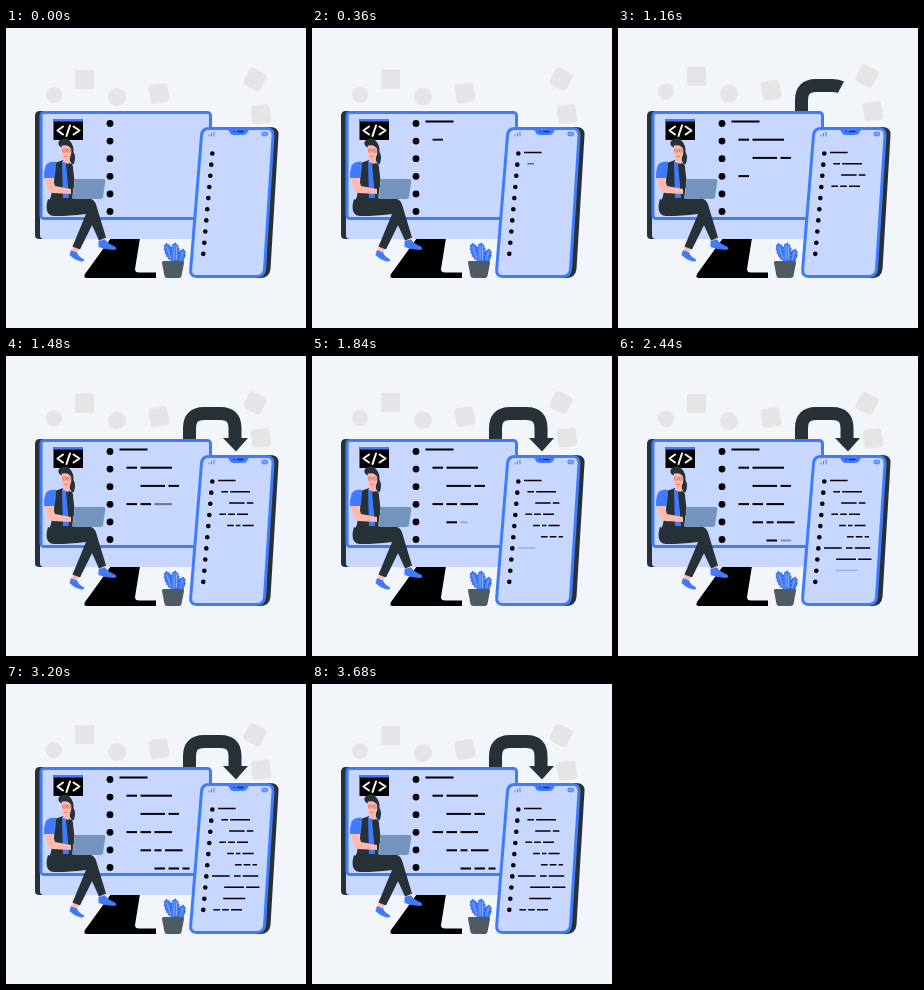
Write an HTML page that moves like this. It is 300 px wide and 300 px high and loops after 3.76 s.

```html
<!DOCTYPE html>
<html lang="en">
<head>
<meta charset="utf-8">
<title>Code to mobile</title>
<style>
  html, body { margin: 0; width: 100%; height: 100%; overflow: hidden; background: #f2f5f9; }
  svg { display: block; width: 100vw; height: 100vh; }
  .blue { fill: #407bff; }
  .pale { fill: #c7d7ff; }
  .dark { fill: #263238; }
  .skin { fill: #ffb9ad; }
  .edge { stroke: #407bff; stroke-width: 3; }
  .pen { fill: none; stroke-linecap: round; stroke-linejoin: round; }
</style>
</head>
<body>
<svg viewBox="0 0 300 300">
  <g id="badges" fill="#e4e5e6">
    <circle cx="48" cy="67" r="8"/>
    <rect x="69" y="42" width="19" height="19"/>
    <circle cx="111" cy="69" r="9"/>
    <rect x="143.5" y="56" width="19" height="19" rx="4" transform="rotate(-9 153 65.5)"/>
    <rect x="239.5" y="42" width="19" height="19" rx="4" transform="rotate(27 249 51.5)"/>
    <rect x="245.5" y="77" width="19" height="19" rx="4" transform="rotate(-7 255 86.5)"/>
  </g>

  <path id="shaft" pathLength="100" d="M183.5 86V72Q183.5 57.5 198 57.5H214.5Q229 57.5 229 72V83"
    fill="none" stroke="#263238" stroke-width="13" stroke-dasharray="100 200"/>
  <path id="head" class="dark" d="M217 82H242L230 95.5Z"/>

  <g id="monitor">
    <path d="M105 210H134L129 241Q129 244.500 133 244.500H150V250H81Q77 250 79 246Z"/>
    <path class="dark" d="M34 83H45V211H33Q29 211 29 207V88Q29 83 34 83Z"/>
    <path class="pale" d="M34 189H204V211H38Q34 211 34 207Z"/>
    <rect class="pale edge" x="35" y="84.500" width="169.500" height="106" rx="3"/>
    <rect x="47.500" y="91" width="29.500" height="21"/>
    <rect class="blue" x="47.500" y="91" width="29.500" height="2.500"/>
    <path class="pen" stroke="#fff" stroke-width="2" d="M57 98.500L51.500 102.500L57 106.500M64 97.500L60.500 108M67.500 98.500L73.500 102.500L67.500 106.500"/>
  </g>

  <g id="phone">
    <path class="dark" d="M205 99H264Q273 99 272.500 107L264.500 241Q263.500 250 254 250H194Z"/>
    <path class="pale edge" d="M203 100.500H260.500Q267.500 100.500 267 108L258.500 241Q258 248.500 250 248.500H190.500Q184 248.500 184.700 241L195.500 107.500Q196 100.500 203 100.500Z"/>
    <path class="blue" d="M219 100H246Q242.500 101.500 241.500 104Q240.500 107 237 107H228Q224.500 107 223.500 104Q222.500 101.500 219 100Z"/>
    <path class="pen" stroke="#263238" stroke-width="1.400" d="M228 103.500H228.100M231.500 103.500H237"/>
    <path class="pen" stroke="#407bff" d="M203 108V107M205.500 108V105.500M208 108V104"/>
    <rect x="256" y="104.200" width="5.500" height="3.600" rx="1.300" fill="#7fa5ff" stroke="#407bff"/>
  </g>

  <g id="plant">
    <g class="blue" stroke="#263238" stroke-dasharray="1 2.500" stroke-width=".8">
      <ellipse cx="163" cy="224" rx="4" ry="9" transform="rotate(-20 163 224)"/>
      <ellipse cx="175.500" cy="228" rx="3.500" ry="7" transform="rotate(15 175.500 228)"/>
      <ellipse cx="169" cy="225" rx="4.500" ry="10"/>
    </g>
    <path class="pen" stroke="#9dbcff" stroke-width=".8" d="M161 219L165 231M168 218V231M170.500 218V231M176.500 224L174.500 231"/>
    <path fill="#4f5b62" d="M157.500 233H176.500Q178.500 233 178 235L175.500 248Q175 250 173 250H161Q159 250 158.500 248L156 235Q155.500 233 157.500 233Z"/>
  </g>

  <g id="coder">
    <path class="skin" d="M67 216L73 218L71 226L66 225ZM92 208L98 207L100 213L95 216Z"/>
    <path class="blue" d="M65 222L71 224.500Q73 229 77.500 231Q79 233.500 76 233.500Q69 232.500 63.500 227ZM92.500 213L99 211.500Q103 216.500 109 218.500Q112 221.500 108 222Q100 222 92.500 219Z"/>
    <path class="dark" d="M42 171Q38 184 45 187.500Q52 189 80 186L66.500 218.500L74 221.500L91 187Z"/>
    <path class="dark" d="M44 170H82Q89 171 90.500 178L100 209.500L93 212.500L80 184L46 186Z"/>
    <path class="dark" d="M49 135L57 132L66 136L68.500 152L66 172H44L48 155Z"/>
    <path class="blue" d="M56 133L61 134L62 146L63 170H57Z"/>
    <path class="dark" d="M60 136L67 138L68 158L63 168Z"/>
    <path class="skin" d="M39 148L46 148L49 158L65 161V166L47 165Q42 164 41 159Z"/>
    <path class="blue" d="M50 134Q42 133 39.500 138Q37.500 144 38 150H48Q50 145 50 134Z"/>
    <path class="dark" d="M53 113Q58 108 63 112Q68 117 67.500 124Q71 130 67 137Q63 134 63 126L55 119Q51 117 53 113Z"/>
    <path class="skin" d="M56 116Q61 113 64.500 118Q66.500 125 64 129L63 136L57 134V130.500Q55 125 56 116Z"/>
    <path class="dark" d="M53.500 113Q60 109 65 115L65.500 121Q62 116 57 117.500Q52.500 117.500 53.500 113Z"/>
    <path class="pen" stroke="#c9655f" stroke-width=".8" d="M56.500 122.500a1.700 1.700 0 1 0 3.400 0a1.700 1.700 0 1 0-3.400 0M61 122.500a1.700 1.700 0 1 0 3.400 0a1.700 1.700 0 1 0-3.400 0M58.500 128.500Q60 129.500 61.500 128"/>
    <path fill="#7294bd" d="M69 151H97.500Q99.500 151 99.300 153L97 169Q96.700 171 94.500 171H66.500Z"/>
  </g>
</svg>
<script>
const LOOP = 3760;
const $ = id => document.getElementById(id);

// Both screens show this listing; every word becomes a bar.
const code = [
  '========',
  '  === =========',
  '      ======= ===',
  '  === === =====',
  '      === == =====',
  '          === === ==',
  '========  === =======',
  '      ========= ======',
  '      ==========',
  '  === === ====='
];

function add(parent, tag, attrs) {
  const el = document.createElementNS('http://www.w3.org/2000/svg', tag);
  for (const k in attrs) el.setAttribute(k, attrs[k]);
  return parent.appendChild(el);
}

const loop = (el, frames) => el.animate(frames, { duration: LOOP, iterations: Infinity });

// Holds the first pose until start, then the last one from end on.
function change(el, start, end, from, to, easing = 'linear') {
  loop(el, [
    { ...from, offset: 0 },
    { ...from, offset: start / LOOP, easing },
    { ...to, offset: end / LOOP },
    { ...to, offset: 1 }
  ]);
}

// timing(row, word, total) gives the moment a word appears.
function typeCode(screen, { rows, x, y, lean, step, char, weight, fade, dot, timing }) {
  let total = 0;
  code.slice(0, rows).forEach((text, row) => {
    const left = x - lean * row;
    add(screen, 'circle', { cx: left + dot.x, cy: dot.y + dot.step * row, r: dot.r });
    [...text.matchAll(/=+/g)].forEach((match, word) => {
      const bar = add(screen, 'rect', {
        x: left + match.index * char,
        y: y + step * row - weight / 2,
        width: match[0].length * char,
        height: weight
      });
      const at = timing(row, word, total++);
      change(bar, at, at + fade, { opacity: 0 }, { opacity: 1 });
    });
  });
}

typeCode($('monitor'), {
  rows: 6, x: 113.5, y: 93.5, lean: 0, step: 18.2, char: 3.5, weight: 2, fade: 120,
  dot: { x: -9.5, y: 95.5, step: 17.6, r: 3.4 },
  timing: (row, word, total) => 60 + 195 * total
});
typeCode($('phone'), {
  rows: 10, x: 212, y: 124.5, lean: 1, step: 11.25, char: 2.2, weight: 1.5, fade: 60,
  dot: { x: -5.7, y: 125.5, step: 11.15, r: 2.3 },
  timing: (row, word) => 30 + 300 * row + 80 * word
});

change($('shaft'), 860, 1340, { strokeDashoffset: 101 }, { strokeDashoffset: 0 }, 'ease-in-out');
$('head').style.transformOrigin = '229px 82px';
change($('head'), 1300, 1480, { transform: 'scale(0)' }, { transform: 'scale(1)' }, 'ease-out');

const float = y => ({ transform: `translateY(${y}px)`, easing: 'ease-in-out' });
loop($('badges'), [float(0), float(-5), float(0)]);
</script>
</body>
</html>
```
